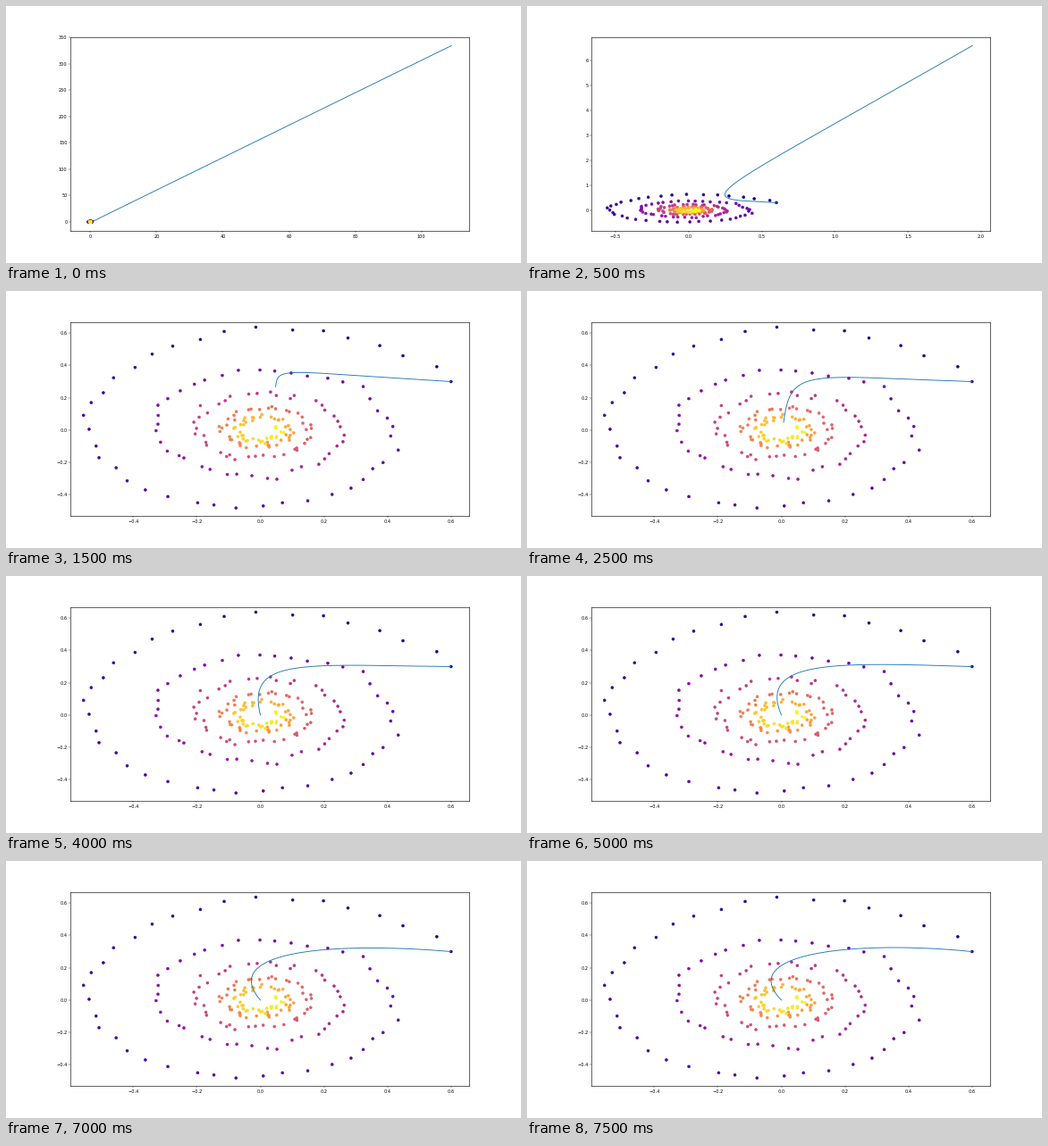
Animation of 576 by 288 pixels, one loop 8000 ms. Source, as a matplotlib script:

```python
import numpy as np
import matplotlib.pyplot as plt
from matplotlib.animation import FuncAnimation

FRAMES = 16
START = np.array([0.6, 0.3])
DECAY = 0.08
LOW, HIGH = (-0.541, -0.476), (0.601, 0.615)  # extent of the observations

# Fitted path at some training steps: two Bezier handles and the end point.
FITS = {
    0: [(0.6, 0.3), (2, 5), (109, 334)],
    1: [(0, 0.5), (0, 0.1), (1.94, 6.6)],
    2: [(-0.03, 0.46), (0.01, 0.18), (0.318, 1.475)],
    3: [(0.06, 0.365), (0.055, 0.395), (0.048, 0.268)],
    5: [(0.07, 0.335), (0.03, 0.39), (0.007, 0.048)],
    8: [(0.13, 0.31), (-0.045, 0.36), (0, 0)],
    15: [(0.25, 0.37), (-0.15, 0.3), (0, 0)],
}


def observations(n=200):
    """Noisy samples of a decaying rotation over five turns."""
    t = np.linspace(0, 5 * 6.29, n)
    z = complex(*START) * np.exp((-DECAY + 1j) * t)
    noise = np.random.default_rng(4).normal(0, 0.01, (n, 2))
    noise[0] = 0
    return t, np.column_stack([z.real, z.imag]) + noise


def blend(step):
    """Handles and end point at a step, linear between the known fits."""
    keys = list(FITS)
    values = np.array(list(FITS.values()), float).reshape(len(keys), -1)
    return np.array([np.interp(step, keys, v) for v in values.T]).reshape(3, 2)


def trajectory(step, samples=300):
    a, b, end = blend(step)
    u = np.linspace(0, 1, samples)[:, None]
    v = 1 - u
    return v**3 * START + 3 * v * v * u * a + 3 * v * u * u * b + u**3 * end


times, obs = observations()
plt.rcParams["axes.linewidth"] = 1.2
fig, ax = plt.subplots(figsize=(16, 8), dpi=36)
fig.subplots_adjust(left=0.125, right=0.9, bottom=0.125, top=0.88)


def draw(step):
    path = trajectory(step)
    low = np.minimum(LOW, path.min(axis=0))
    high = np.maximum(HIGH, path.max(axis=0))
    margin = 0.05 * (high - low)

    ax.clear()
    ax.scatter(*obs.T, c=times, cmap="plasma")
    ax.plot(*path.T, lw=1.8)
    ax.set_xlim(low[0] - margin[0], high[0] + margin[0])
    ax.set_ylim(low[1] - margin[1], high[1] + margin[1])


anim = FuncAnimation(fig, draw, frames=FRAMES, interval=500,
                     init_func=lambda: None, repeat=True, repeat_delay=0)
plt.show()
```
